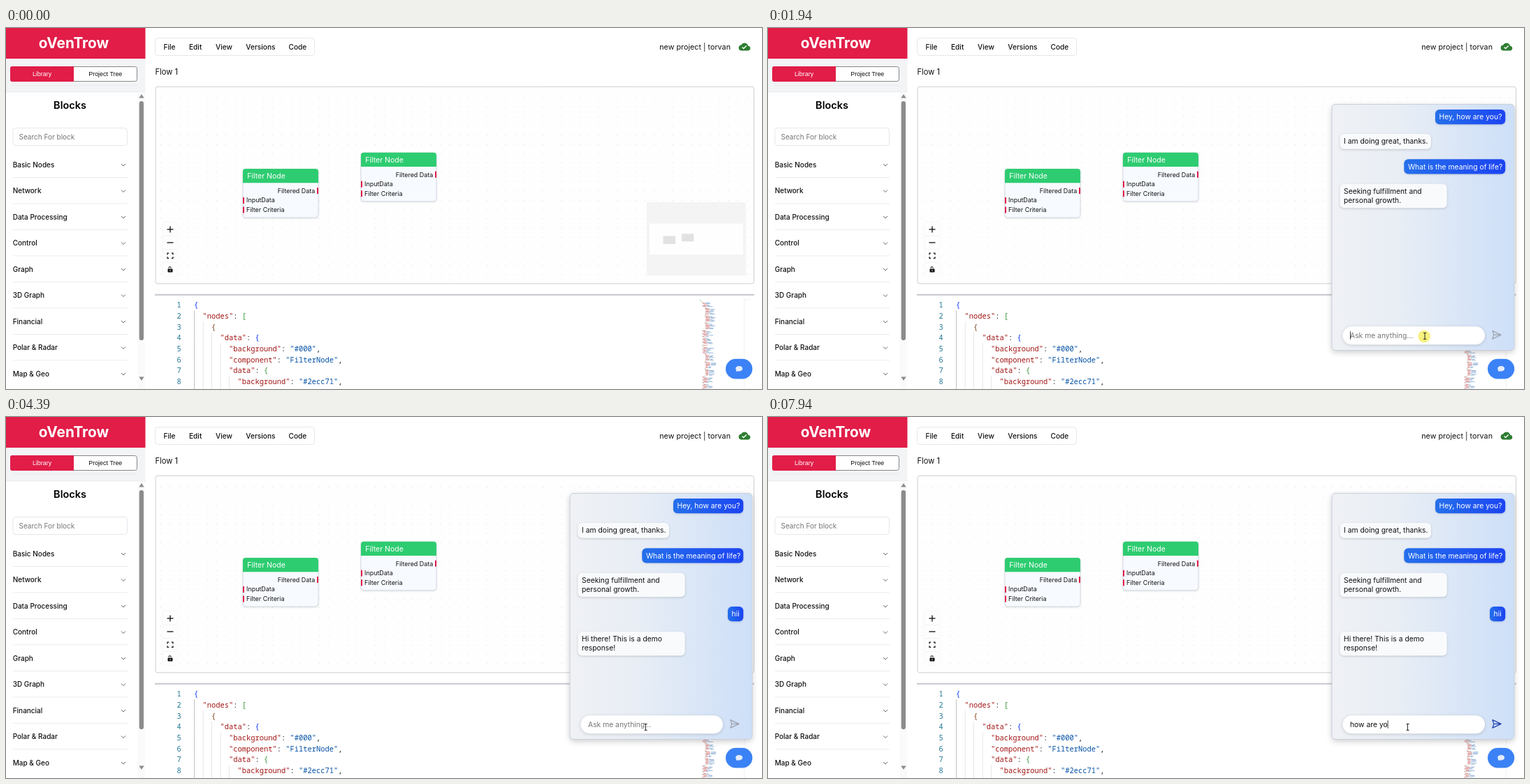
These frames come from a looping animation (1082x518 px, 8000 ms). An HTML page with a canvas:

```html
<!DOCTYPE html>
<html lang="en">
<head>
<meta charset="utf-8">
<title>Flow editor with chat</title>
<style>
html, body { margin: 0; width: 100%; height: 100%; overflow: hidden; background: #fff; }
canvas { display: block; width: 1082px; height: 518px; }
</style>
</head>
<body>
<canvas id="stage"></canvas>
<script>
const W = 1082, H = 518, LOOP = 8000;
const SANS = 'Inter, sans-serif', ARIAL = '"Liberation Sans", Arial, sans-serif';
const MONO = '"Noto Sans Mono", monospace';
const ROSE = '#e11d48', LINE = '#e5e7eb';
const CHAT_SIZE = 10.33;
const dpr = window.devicePixelRatio || 1;
let ctx;

function setup(canvas) {
  canvas.width = W * dpr;
  canvas.height = H * dpr;
  const c = canvas.getContext('2d');
  c.scale(dpr, dpr);
  return c;
}

// Text is placed by the vertical centre of its capitals.
function text(str, x, cy, size, color = '#111', weight = 400, align = 'left', font = SANS) {
  ctx.font = `${weight} ${size}px ${font}`;
  ctx.fillStyle = color;
  ctx.textAlign = align;
  ctx.fillText(str, x, cy + size * 0.36);
}

function rect(x, y, w, h, color) {
  ctx.fillStyle = color;
  ctx.fillRect(x, y, w, h);
}

function box(x, y, w, h, r, fill, stroke) {
  ctx.beginPath();
  ctx.roundRect(x, y, w, h, r);
  if (fill) { ctx.fillStyle = fill; ctx.fill(); }
  if (stroke) { ctx.strokeStyle = stroke; ctx.lineWidth = 1; ctx.stroke(); }
}

function shadowBox(x, y, w, h, r, fill, blur, dy, alpha) {
  ctx.save();
  ctx.shadowColor = `rgba(0,0,0,${alpha})`;
  ctx.shadowBlur = blur * dpr;
  ctx.shadowOffsetY = dy * dpr;
  box(x, y, w, h, r, fill);
  ctx.restore();
}

function poly(points, color, width) {
  ctx.beginPath();
  points.forEach(([x, y], i) => i ? ctx.lineTo(x, y) : ctx.moveTo(x, y));
  if (width) { ctx.strokeStyle = color; ctx.lineWidth = width; ctx.stroke(); }
  else { ctx.fillStyle = color; ctx.fill(); }
}

function drawIcon(d, x, y, scale, fill, stroke, width) {
  const path = new Path2D(d);
  ctx.save();
  ctx.translate(x, y);
  ctx.scale(scale, scale);
  ctx.lineJoin = ctx.lineCap = 'round';
  if (fill) { ctx.fillStyle = fill; ctx.fill(path); }
  if (stroke) { ctx.strokeStyle = stroke; ctx.lineWidth = width; ctx.stroke(path); }
  ctx.restore();
}

const CLOUD = 'M19.35 10.04C18.67 6.59 15.64 4 12 4 9.11 4 6.6 5.64 5.35 8.04 2.34 8.36 0 10.91 0 14c0 3.31 2.69 6 6 6h13c2.76 0 5-2.24 5-5 0-2.64-2.05-4.78-4.65-4.96zM10 17l-3.5-3.5 1.4-1.4 2.1 2.1L15.2 9l1.4 1.4z';
const SEND = 'M3 3l3 9-3 9 19-9zM6 12h16';
const HAND = 'M-1 0q1-1 2 0v5l4 1q1.5.5 1.2 2l-.7 4.5h-5.5l-3.5-5q.5-1.5 2.5 0z';
const ARROW = 'M0 0v11l2.6-2.4 1.7 3.9 1.6-.7-1.7-3.8h3.6z';

function sidebar() {
  rect(0, 0, 199.5, 44, ROSE);
  text('oVenTrow', 97, 21.5, 20.8, '#fff', 700, 'center');
  rect(0, 44, 199.5, 48, '#f3f4f6');
  rect(8, 82, 180, 1, '#e9eaed');
  box(6.5, 55.5, 181, 21, 3, '#fff', '#858585');
  box(6, 55, 91, 22, [3, 0, 0, 3], ROSE);
  text('Library', 51.5, 66, 8.9, '#fff', 400, 'center', ARIAL);
  text('Project Tree', 142.3, 66, 8.9, '#111', 400, 'center', ARIAL);
  rect(0, 91.5, 199.5, 0.7, LINE);

  text('Blocks', 91.5, 110.5, 14.5, '#000', 600, 'center');
  box(10, 143.5, 163.5, 25, 4, '#fff', LINE);
  text('Search For block', 18.5, 156, 10, '#757575');
  const items = ['Basic Nodes', 'Network', 'Data Processing', 'Control', 'Graph',
    '3D Graph', 'Financial', 'Polar & Radar', 'Map & Geo'];
  items.forEach((name, i) => {
    const y = 196 + i * 37.5;
    text(name, 9.7, y, 10, '#111', 500);
    poly([[165, y - 1], [168, y + 2], [171, y - 1]], '#555', 0.9);
    if (i < 8) rect(10, y + 18, 164, 0.8, LINE);
  });

  rect(188.5, 92, 10.5, 426, '#fafafa');
  box(190.7, 105, 6.3, 343, 3.1, '#8b8b8b');
  poly([[190.3, 100.5], [194, 95], [197.7, 100.5]], '#8b8b8b');
  poly([[190.3, 500.5], [194, 506], [197.7, 500.5]], '#8b8b8b');
}

function topBar() {
  box(213.5, 14.5, 228, 25, 4, '#fff', LINE);
  [['File', 225.5], ['Edit', 262], ['View', 300], ['Versions', 343.3], ['Code', 404.5]]
    .forEach(([s, x]) => text(s, x, 27.3, 10.15, '#111', 500));
  text('new project | torvan', 1037, 27.3, 10.75, '#111', 400, 'right');
  drawIcon(CLOUD, 1048.6, 18.6, 0.7, '#2e7d32');
  text('Flow 1', 213.5, 63.5, 11.1, '#111');
}

function node(x, y) {
  shadowBox(x, y, 108, 70, 4, '#f7faff', 3, 1, 0.14);
  box(x, y + 0.5, 108, 69.5, 4, '#f7faff', '#d5dbe3');
  box(x, y, 108, 20.3, [4, 4, 0, 0], '#2ecc71');
  text('Filter Node', x + 6.3, y + 10.2, 10.5, '#fff');
  text('Filtered Data', x + 103.3, y + 31.6, 8.95, '#111', 400, 'right');
  text('InputData', x + 5, y + 45.2, 8.95);
  text('Filter Criteria', x + 5, y + 58.8, 8.95);
  rect(x + 106, y + 27, 2, 9, ROSE);
  rect(x, y + 41, 2, 9, ROSE);
  rect(x, y + 54.5, 2, 9, ROSE);
}

function controls() {
  shadowBox(225, 279, 19.3, 77, 0, '#fefefe', 2, 0, 0.08);
  for (let i = 1; i < 4; i++) rect(225, 278.5 + i * 19.3, 19.3, 0.7, '#eee');
  rect(230.5, 288.3, 9, 1.3, '#111');
  rect(234.35, 284.5, 1.3, 9, '#111');
  rect(230.5, 307.3, 9, 1.3, '#111');
  for (const sx of [-1, 1]) for (const sy of [-1, 1]) {
    const at = (dx, dy) => [235 + sx * dx, 326.8 + sy * dy];
    poly([at(1.8, 3.6), at(4, 3.6), at(4, 1.4)], '#111', 1.2);
  }
  box(231.5, 345.6, 7, 5, 0.8, '#111');
  ctx.beginPath();
  ctx.arc(234.6, 344.6, 1.8, Math.PI, Math.PI * 1.95);
  ctx.strokeStyle = '#111';
  ctx.lineWidth = 1.1;
  ctx.stroke();
  rect(234.4, 347.3, 1.2, 1.5, '#fff');
}

function flowArea() {
  box(214, 84.3, 856.5, 282.5, 3, '#fefefe', '#cfcfcf');
  for (let y = 100; y < 366; y += 13.33)
    for (let x = 221; x < 1070; x += 13.33) rect(Math.round(x), Math.round(y), 1, 1, '#dedede');
  node(339, 202);
  node(508, 178.7);
  controls();
  rect(917, 249.7, 142, 105.3, '#f4f4f4');
  box(921, 280.5, 134, 44.5, 1, '#fefefe');
  box(940.5, 298.5, 17.7, 11.5, 1, '#e2e2e2');
  box(967, 295.3, 17.4, 11, 1, '#e2e2e2');
}

const KEY = '#a31515', VAL = '#0451a5', DARK = '#222';
const B1 = '#0431fa', B2 = '#319331', B3 = '#7b3814';
const CODE = [
  [0, ['{', B1]],
  [1, ['"nodes"', KEY], [': ', DARK], ['[', B2]],
  [2, ['{', B3]],
  [3, ['"data"', KEY], [': ', DARK], ['{', B1]],
  [4, ['"background"', KEY], [': ', DARK], ['"#000"', VAL], [',', DARK]],
  [4, ['"component"', KEY], [': ', DARK], ['"FilterNode"', VAL], [',', DARK]],
  [4, ['"data"', KEY], [': ', DARK], ['{', B2]],
  [5, ['"background"', KEY], [': ', DARK], ['"#2ecc71"', VAL], [',', DARK]],
  [5, ['"form"', KEY], [': ', DARK], ['{', B3]]
];

function editor() {
  const cw = 6.25, lh = 15.64, size = 10.42;
  rect(213, 381.7, 858, 2.2, '#c9ccd4');
  CODE.forEach(([depth, ...parts], i) => {
    const y = 397.6 + i * lh;
    for (let d = 0; d < depth; d++)
      rect(269.3 + d * cw * 2, y - lh / 2, 0.7, lh, d ? '#dcdcdc' : '#a5a5a5');
    text(i + 1, 250.7, y, size, '#237893', 500, 'right', MONO);
    let x = 269 + depth * cw * 2;
    for (const [s, color] of parts) {
      text(s, x, y, size, color, 500, 'left', MONO);
      x += s.length * cw;
    }
  });
  codeMap();
  rect(1056, 389.5, 0.7, 129, '#ececec');
  rect(1056, 389.5, 10, 0.7, '#ececec');
}

// Tiny overview of the code: repeating blocks of key and value strokes.
function codeMap() {
  let seed = 7;
  const rnd = () => (seed = (seed * 16807) % 2147483647) / 2147483647;
  ctx.globalAlpha = 0.5;
  for (let i = 0; i < 97; i++) {
    const k = i % 50, y = 390 + i * 1.33;
    const depth = i < 3 ? i : k < 8 ? 3 + k % 3 : k < 32 ? 6 + (k % 8 > 1 ? 1 : 0) : 3 + k % 3;
    const x = 992.5 + depth * 1.25;
    if (i < 3 || k % 8 === 0) { rect(x, y, 1.5, 0.7, B2); continue; }
    const a = 3 + rnd() * 4, b = k % 4 === 1 ? 1 : 3 + rnd() * 5;
    rect(x, y, a, 0.8, KEY);
    rect(x + a + 1, y, b, 0.8, VAL);
  }
  ctx.globalAlpha = 1;
}

function chatButton() {
  box(1030, 474.7, 38.3, 28.8, 14.4, '#3b82f6');
  ctx.beginPath();
  ctx.ellipse(1049.2, 488.8, 5, 3.8, 0, 0, Math.PI * 2);
  ctx.fillStyle = '#e3ecfa';
  ctx.fill();
  poly([[1045.2, 490], [1045, 492.8], [1049, 492.2]], '#e3ecfa');
}

function said(y, w, str) {
  const x = 1055.3 - w, g = ctx.createLinearGradient(x, 0, x + w, 0);
  g.addColorStop(0, '#2570eb');
  g.addColorStop(1, '#1c44f2');
  shadowBox(x, y, w, 21.3, 6, g, 3, 1, 0.12);
  text(str, x + 5.6, y + 10.6, CHAT_SIZE, '#fff');
}

function reply(y, w, lines) {
  shadowBox(818.5, y, w, 9 + lines.length * 12.8, 6, '#f8fafc', 3, 1, 0.18);
  lines.forEach((s, i) => text(s, 824, y + 10.6 + i * 12.8, CHAT_SIZE));
}

function chatPanel() {
  const g = ctx.createLinearGradient(807, 0, 1068, 0);
  g.addColorStop(0, '#eff1f5');
  g.addColorStop(0.35, '#e9eef5');
  g.addColorStop(1, '#cddff8');
  shadowBox(807, 109.5, 261, 353, 5, '#eef1f5', 8, 3, 0.2);
  box(807, 109.5, 261, 353, 5, g, '#c9d0da');
  said(117, 100.3, 'Hey, how are you?');
  reply(152, 130.5, ['I am doing great, thanks.']);
  said(188.2, 145, 'What is the meaning of life?');
  reply(223.7, 153.3, ['Seeking fulfillment and', 'personal growth.']);
  shadowBox(822.5, 428.3, 203.5, 26, 13, '#fff', 4, 1, 0.16);
}

function layer(...parts) {
  const canvas = document.createElement('canvas');
  ctx = setup(canvas);
  parts.forEach(draw => draw());
  return canvas;
}

const base = layer(() => rect(0, 0, W, H, '#fff'), sidebar, topBar, flowArea, editor, chatButton);
const panel = layer(chatPanel);
ctx = setup(document.getElementById('stage'));

const TYPED = [
  [2670, 'h'], [3070, 'hi'], [3290, 'hii'], [3690, ''],
  [5330, 'h'], [5670, 'ho'], [6070, 'how'], [6400, 'how '], [6730, 'how a'],
  [6930, 'how ar'], [7060, 'how are'], [7320, 'how are '], [7590, 'how are y'], [7940, 'how are yo']
];
const MOVES = [
  [390, 730, 6, [1000, 513], [1046.5, 493.5]],
  [1410, 1864, 7, [1046.5, 493.5], [940, 441.7]],
  [3760, 4320, 9, [940, 441.7], [915.5, 444.7]]
];
const CLICKS = [[940, 1210], [1940, 2140], [4660, 4860]];
const CARET_ON = [[1940, 2470], [2670, 4190], [4660, 5200], [5330, LOOP]];
const during = (spans, t) => spans.some(([a, b]) => t >= a && t < b);

function pointerAt(t) {
  let pos = null;
  for (const [from, to, steps, a, b] of MOVES) {
    if (t < from) break;
    const gap = (to - from) / (steps - 1);
    const k = Math.min(steps, Math.floor((t - from) / gap + 1e-6) + 1) / steps;
    const p = k * k * (3 - 2 * k);
    pos = [a[0] + (b[0] - a[0]) * p, a[1] + (b[1] - a[1]) * p];
  }
  return pos;
}

function pointer(t) {
  const pos = pointerAt(t);
  if (!pos) return;
  const [x, y] = pos;
  if (during(CLICKS, t)) {
    ctx.beginPath();
    ctx.arc(x - 0.8, y + 0.8, 8.8, 0, Math.PI * 2);
    ctx.fillStyle = 'rgba(240,230,50,0.62)';
    ctx.fill();
  }
  const inField = t > 1210 && x < 1026 && y > 428 && y < 454;
  if (inField) {
    rect(x - 0.4, y - 4, 0.9, 8.6, '#111');
    for (const dy of [-4.6, 4.2]) rect(x - 2, dy + y, 4.2, 0.9, '#111');
  } else {
    const onButton = x > 1030 && y > 474;
    drawIcon(onButton ? HAND : ARROW, x, y, 1, '#fff', '#111', 0.9);
  }
}

function chat(t) {
  ctx.drawImage(panel, 0, 0, W, H);
  if (t >= 3690) said(272, 22.3, 'hii');
  if (t >= 4190) reply(308, 153.3, ['Hi there! This is a demo', 'response!']);
  let typed = '';
  for (const [at, str] of TYPED) if (t >= at) typed = str;
  text(typed || 'Ask me anything...', 833, 441.2, CHAT_SIZE, typed ? '#111' : '#757575');
  if (during(CARET_ON, t)) {
    const w = typed ? ctx.measureText(typed).width : 0;
    rect(833 + w, 435.3, 0.8, 11.5, '#111');
  }
  drawIcon(SEND, 1035, 432.7, 0.64, null, typed ? '#1e40af' : '#9ca3af', 2);
}

function render(t) {
  ctx.drawImage(base, 0, 0, W, H);
  const bar = Math.max(0, Math.min(1, (t - 390) / 270));
  if (bar) rect(1056, 389.7, 10, 14.2, `rgba(193,193,193,${bar})`);
  if (t >= 1210) chat(t);
  pointer(t);
}

const start = performance.now();
function frame(now) {
  render(Math.max(0, now - start) % LOOP);
  requestAnimationFrame(frame);
}
render(0);
requestAnimationFrame(frame);
</script>
</body>
</html>
```
